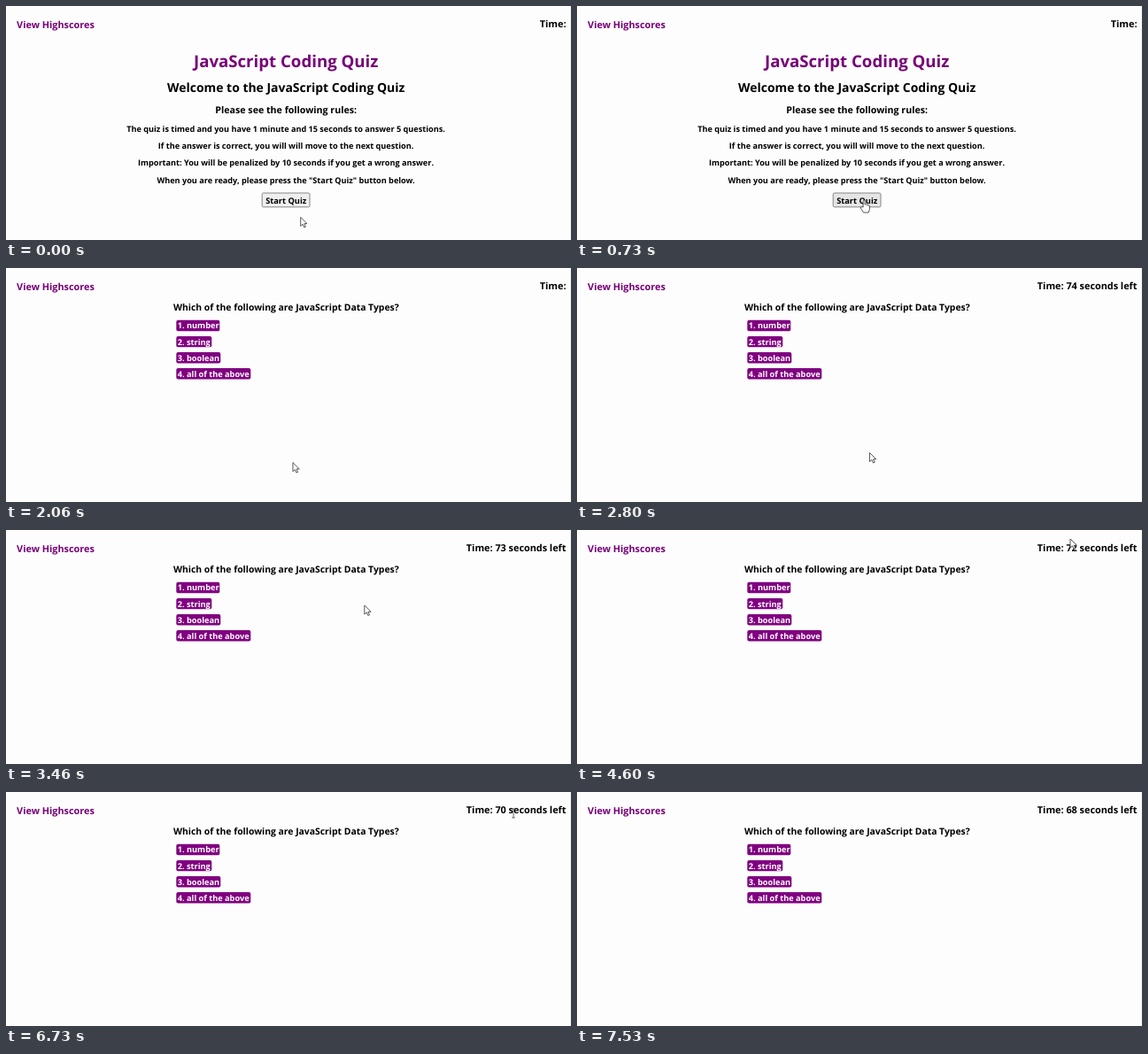
These frames come from a looping animation (638 by 264 pixels, 7.6 s). An HTML page:

```html
<!DOCTYPE html>
<html lang="en">
<head>
<meta charset="utf-8">
<title>JavaScript Coding Quiz</title>
<style>
  html, body { margin: 0; width: 100%; height: 100%; overflow: hidden; background: #fdfdfd; }
  svg { display: block; }
  text { font: 700 9.13px "Open Sans", "Noto Sans", sans-serif; text-rendering: geometricPrecision; }
  .mid text { text-anchor: middle; }
  .purple { fill: #760078; }
  .bar { font-size: 10.85px; }
  #time { text-anchor: end; }
  #answers rect { fill: #800080; }
  #answers text { fill: #fff; font-size: 9.2px; }
  #cursor path { fill: #fff; stroke: #444; stroke-width: .9; stroke-linejoin: round; }
  #cursor #beam { fill: none; stroke: #555; }
</style>
</head>
<body>
<svg width="638" height="264" viewBox="0 0 638 264">
  <rect x="637" width="1" height="264" fill="#ececec"/>
  <text class="bar purple" x="12.1" y="24.5">View Highscores</text>
  <text class="bar" id="time" x="632.5" y="24.3">Time:</text>

  <g id="intro" class="mid">
    <text class="purple" x="316.2" y="69" style="font-size:18.65px">JavaScript Coding Quiz</text>
    <text x="316.2" y="97.4" style="font-size:13.95px">Welcome to the JavaScript Coding Quiz</text>
    <text x="316.2" y="120.5" style="font-size:10.65px">Please see the following rules:</text>
    <text x="316" y="142">The quiz is timed and you have 1 minute and 15 seconds to answer 5 questions.</text>
    <text x="316" y="161">If the answer is correct, you will will move to the next question.</text>
    <text x="316" y="180.3">Important: You will be penalized by 10 seconds if you get a wrong answer.</text>
    <text x="316" y="199.7">When you are ready, please press the "Start Quiz" button below.</text>
    <rect id="start" x="289.2" y="211" width="53.8" height="15.8" rx="1.5" stroke="#858585"/>
    <text x="316.2" y="222.8" style="font-size:9.24px">Start Quiz</text>
  </g>

  <g id="question">
    <text x="189" y="48.3" style="font-size:10.38px">Which of the following are JavaScript Data Types?</text>
    <g id="answers"></g>
  </g>

  <g id="cursor">
    <path id="arrow" d="M.5 .5V10.6L2.9 8.4L4.5 12L6.2 11.3L4.6 7.8H7.8Z"/>
    <path id="hand" d="M-.9 8V1.2Q-.9 0 .1 0T1.1 1.2V5Q2.6 4.4 2.9 5.4Q4.3 4.8 4.7 5.8Q6.4 5.6 6.4 7V10.4L5.3 14H-.4L-3.6 9.2Q-4 7.6-2.6 7.5Z"/>
    <path id="beam" d="M-1.8-5H1.8M0-5V5M-1.8 5H1.8"/>
  </g>
</svg>
<script>
const LOOP = 7600, CLICK = 1460;
const $ = id => document.getElementById(id);
const show = (id, on) => $(id).style.display = on ? "" : "none";

const answers = [["number", 49], ["string", 40], ["boolean", 50], ["all of the above", 84]];
$("answers").innerHTML = answers.map(([label, w], i) => `
  <rect x="192.3" y="${58.8 + 18.1 * i}" width="${w}" height="12.4" rx="2"/>
  <text x="193.8" y="${68.4 + 18.1 * i}">${i + 1}. ${label}</text>`).join("");

// Pointer stops: time, x, y
const path = [
  [0, 332.2, 237.8], [200, 332.2, 237.8], [660, 324, 219], [2660, 323.3, 219],
  [3460, 404.3, 84.5], [3960, 553, 8], [4600, 556.5, 9.5], [5300, 562, 10], [5800, 573, 24], [LOOP, 573, 24]
];
// Time at which each remaining-seconds value appears
const ticks = [[2460, 74], [3460, 73], [4460, 72], [5460, 71], [6460, 70], [7460, 69], [7530, 68]];

function pointer(t) {
  const i = path.findIndex(p => p[0] > t);
  const [t0, x0, y0] = path[i - 1], [t1, x1, y1] = path[i];
  const u = (t - t0) / (t1 - t0), e = u * u * (3 - 2 * u);
  return [x0 + (x1 - x0) * e, y0 + (y1 - y0) * e];
}

function draw(now) {
  const t = now % LOOP, intro = t < CLICK;
  const [x, y] = pointer(t);
  const hover = intro && y < 227, overText = !intro && x > 520 && y > 15 && y < 28;
  show("intro", intro);
  show("question", !intro);
  $("start").setAttribute("fill", hover ? "#e5e5e5" : "#efefef");

  const tick = ticks.filter(k => k[0] <= t).pop();
  $("time").textContent = tick ? `Time: ${tick[1]} seconds left` : "Time:";

  show("cursor", t < 7530);
  $("cursor").setAttribute("transform", `translate(${x} ${y})`);
  show("hand", hover);
  show("beam", overText);
  show("arrow", !hover && !overText);
}

const begin = performance.now();
function frame() {
  draw(performance.now() - begin);
  requestAnimationFrame(frame);
}
frame();
</script>
</body>
</html>
```
